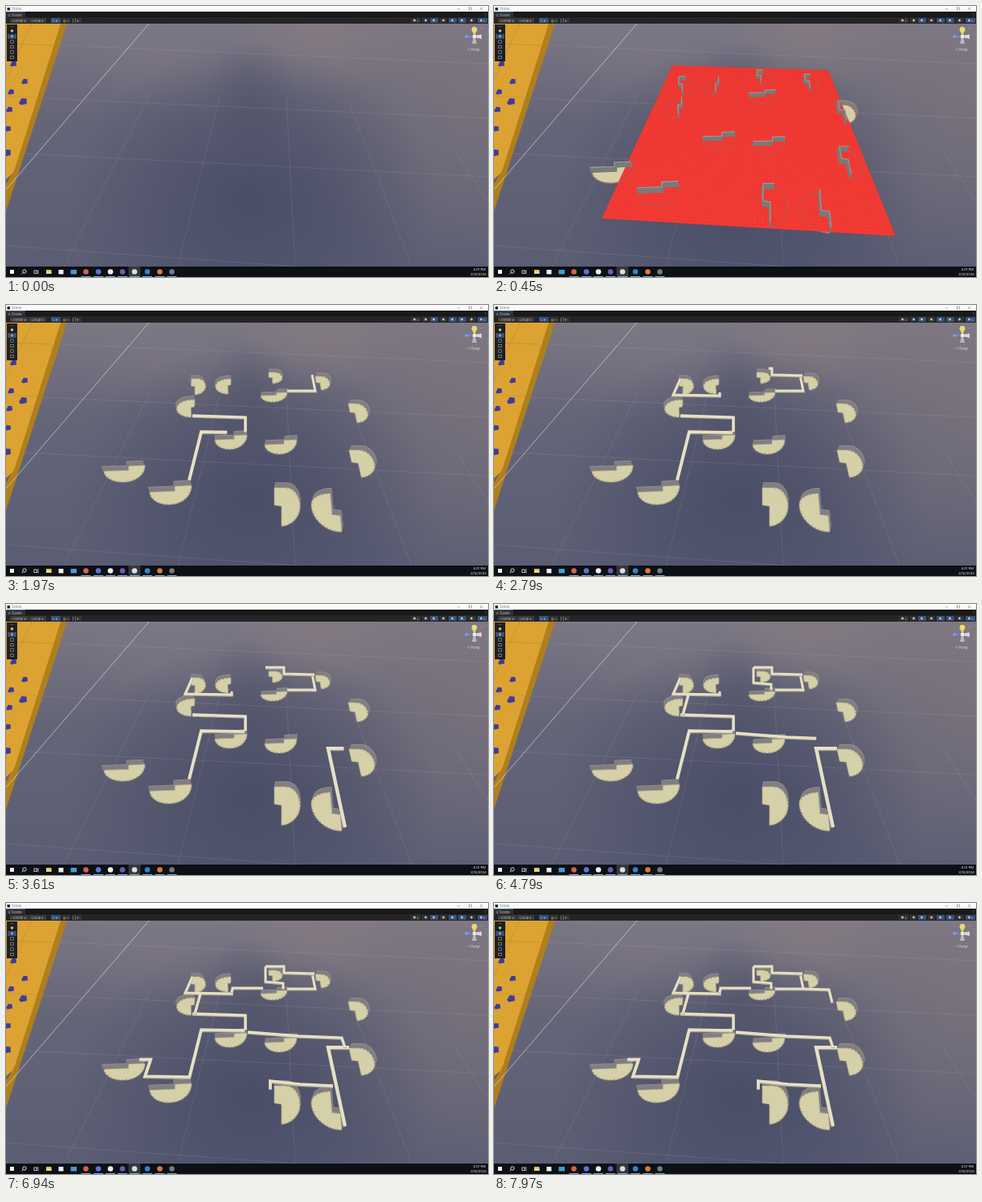
These frames come from a looping animation (600x338 px, 8000 ms). An HTML page with a canvas:

```html
<!DOCTYPE html>
<html lang="en">
<head>
<meta charset="utf-8">
<title>Scene</title>
<style>
html, body { margin: 0; width: 100%; height: 100%; overflow: hidden; background: #111; }
canvas { display: block; width: 600px; height: 338px; }
</style>
</head>
<body>
<canvas id="stage"></canvas>
<script>
const canvas = document.getElementById('stage');
const dpr = window.devicePixelRatio || 1;
canvas.width = 600 * dpr;
canvas.height = 338 * dpr;
let c = canvas.getContext('2d');

const LOOP = 8000, ROOMS_AT = 170, GRID_ON = 230, GRID_OFF = 730;

// Room outlines in a unit box: straight walls, then the curved wall.
const SHAPES = {
  down: ['M0 .35L.6 .3L.6 .05L1 0', 'C1 .6 .75 1 .45 1C.2 1 0 .7 0 .35', '1 0'],
  right: ['M.45 0L0 0L0 .45L.28 .48L.28 1', 'C.7 .98 1 .75 1 .5C1 .2 .75 0 .45 0', '.28 1'],
  left: ['M.62 0L.68 .55L.95 .58L1 1', 'C.4 1 0 .6 0 .3C0 .1 .3 0 .62 0', '1 1'],
  hook: ['M1 0L1 .4L.8 .45L.85 1', 'C.4 1 0 .8 0 .5C0 .2 .4 0 1 0', '.85 1']
};

// shape, x, y, width, height, lean
const rooms = [
  ['right', 327, 84, 17, 14, 0], ['right', 385, 89, 17, 17, .15],
  ['right', 231, 92, 18, 20, -.05], ['hook', 261, 92, 19, 19, -.03],
  ['down', 317, 109, 33, 12, 0], ['hook', 213, 118, 22, 22, -.05],
  ['right', 426, 123, 22, 24, .2], ['down', 260, 162, 40, 18, 0],
  ['down', 322, 168, 40, 18, 0], ['right', 427, 181, 28, 34, .22],
  ['down', 122, 200, 51, 21, 0], ['down', 179, 225, 52, 24, 0],
  ['right', 334, 228, 32, 48, 0], ['left', 380, 235, 38, 48, 0]
].map(([type, x, y, w, h, lean]) => {
  const [straight, curve, join] = SHAPES[type];
  const place = d => {
    const p = new Path2D();
    p.addPath(new Path2D(d), new DOMMatrix([w, 0, lean * h, h, x, y]));
    return p;
  };
  return {
    full: place(straight + curve + 'Z'), straight: place(straight),
    curve: place('M' + join + curve),
    tall: 3 + y / 60, tilt: (x + w / 2 - 300) / 55
  };
});

// start time, then the points the corridor runs through
const corridors = [
  [750, 381, 87, 385, 107, 350, 107],
  [1050, 298, 158, 298, 140, 232, 138],
  [1500, 228, 218, 243, 158, 297, 159],
  [2080, 281, 109, 281, 113, 223, 112, 232, 92],
  [2500, 384, 88, 346, 87, 346, 79, 323, 79],
  [2900, 422, 278, 401, 180, 427, 180],
  [3650, 235, 138, 242, 113],
  [3850, 323, 79, 323, 98, 345, 100, 345, 107],
  [4250, 301, 161, 365, 166, 418, 168, 422, 180],
  [4950, 407, 228, 366, 226, 329, 222, 329, 232],
  [5700, 230, 217, 173, 216, 180, 195, 166, 195],
  [6450, 320, 106, 282, 106, 281, 112],
  [6950, 385, 107, 417, 108, 421, 124],
  [7500]
].map(([start, ...p], i, all) => {
  const path = new Path2D();
  let length = 0;
  for (let k = 0; k < p.length; k += 2) {
    path.lineTo(p[k], p[k + 1]);
    if (k) length += Math.hypot(p[k] - p[k - 2], p[k + 1] - p[k - 1]);
  }
  const end = all[i + 1] ? all[i + 1][0] : start;
  return { start, end, path, length, width: 2.5 + (p[1] || 0) / 150 };
});

function rect(x, y, w, h, fill) {
  c.fillStyle = fill;
  c.fillRect(x, y, w, h);
}
function poly(fill, ...p) {
  c.beginPath();
  for (let i = 0; i < p.length; i += 2) c.lineTo(p[i], p[i + 1]);
  c.closePath();
  c.fillStyle = fill;
  c.fill();
}
function line(color, width, x1, y1, x2, y2) {
  c.beginPath();
  c.moveTo(x1, y1);
  c.lineTo(x2, y2);
  c.strokeStyle = color;
  c.lineWidth = width;
  c.stroke();
}
function dot(x, y, r, fill) {
  c.beginPath();
  c.arc(x, y, r, 0, 7);
  c.fillStyle = fill;
  c.fill();
}
function text(s, x, y, size, fill, align = 'left') {
  c.font = size + 'px Inter, "Open Sans", sans-serif';
  c.textAlign = align;
  c.fillStyle = fill;
  c.fillText(s, x, y);
}
function glow(x, y, rx, ry, rgb, alpha) {
  c.save();
  c.translate(x, y);
  c.scale(rx, ry);
  const g = c.createRadialGradient(0, 0, 0, 0, 0, 1);
  g.addColorStop(0, `rgba(${rgb},${alpha})`);
  g.addColorStop(.5, `rgba(${rgb},${alpha * .55})`);
  g.addColorStop(1, `rgba(${rgb},0)`);
  rect(-1, -1, 2, 2, g);
  c.restore();
}

function drawGround() {
  const g = c.createLinearGradient(0, 22, 0, 325);
  g.addColorStop(0, '#7b7784');
  g.addColorStop(.4, '#656578');
  g.addColorStop(1, '#5a5d73');
  rect(0, 22, 600, 303, g);
  glow(600, 110, 240, 240, '132,121,126', .6);
  glow(390, 40, 110, 70, '140,126,128', .5);
  glow(190, 65, 100, 60, '130,120,130', .35);
  glow(305, 240, 230, 190, '66,71,98', .75);
  glow(305, 120, 60, 80, '76,77,100', .4);

  const faint = 'rgba(190,190,205,.24)';
  for (const [a, b] of [[46, 72], [113, 140], [183, 213], [299, 342]])
    line(faint, .6, 0, a, 600, b);
  line(faint, .6, 180, 108, 72, 325);
  line(faint, .6, 266, 112, 214, 325);
  line(faint, .6, 349, 112, 360, 325);
  line(faint, .6, 427, 120, 505, 325);
  line(faint, .6, 560, 182, 600, 245);
}

function drawSlab() {
  poly('#b07f1d', 67, 22, 76, 22, 0, 256, 0, 222, 10, 205);
  poly('#dca332', 0, 22, 68, 22, 11, 203, 8, 209, 0, 216);
  line('#b98a30', .6, 0, 47, 61, 49);
  line('#b98a30', .6, 32, 22, 0, 92);
  line('#c4933a', .6, 0, 112, 39, 114);
  for (const [x, y, s] of [[9, 72, 4], [23, 94, 4], [6, 107, 4], [21, 119, 5], [4, 129, 4], [2, 153, 4], [1, 183, 5]])
    poly('#3f3c9c', x - s, y + 2, x - s * .3, y - s * .8, x + s * .9, y - s * .7, x + s, y + s * .6, x - s * .5, y + s * .9);
  line('rgba(225,225,230,.8)', .8, 178, 22, 0, 229);
}

function drawTools() {
  rect(1, 23, 13, 46, '#1e1e20');
  rect(2, 35, 11, 6, '#354d6d');
  line('#555', .8, 5, 25.5, 10, 25.5);
  dot(7.5, 31, 1.8, '#c9bd87');
  line('#b9c7dc', .8, 5.5, 38, 9.5, 38);
  line('#b9c7dc', .8, 7.5, 36, 7.5, 40);
  c.lineWidth = .7;
  c.strokeStyle = '#999';
  for (const y of [44.5, 51, 57.5, 64]) c.strokeRect(5.7, y - 1.7, 3.6, 3.4);
}

function drawGizmo() {
  poly('#d8d8dc', 583, 37, 592, 35.5, 592, 41, 583, 39);
  poly('#b7b9c0', 582, 39, 584, 39, 586, 47, 580, 47);
  poly('#e3d05c', 579.5, 29, 586.5, 29, 583.5, 37, 582.5, 37);
  dot(583, 29.3, 3.3, '#eadb78');
  poly('#6a8bdc', 583, 38, 573, 36, 572, 40);
  dot(573, 38, 1.8, '#7fa0e8');
  rect(581, 36, 4, 4, '#e8e8ea');
  dot(592.5, 28.5, 1, '#b98b91');
  text('< Persp', 582, 55.5, 4.3, '#dddde2', 'center');
}

function drawTopBars() {
  rect(0, 0, 600, 7, '#fbfbfb');
  rect(1.5, 2, 3.5, 3.5, '#222');
  text('Scene', 7, 5.3, 4.2, '#777');
  line('#777', .6, 562, 3.7, 565, 3.7);
  c.lineWidth = .6;
  c.strokeStyle = '#777';
  c.strokeRect(576.5, 2, 3, 3);
  line('#777', .6, 590, 2, 593, 5);
  line('#777', .6, 593, 2, 590, 5);

  rect(0, 7, 600, 7, '#191919');
  rect(0, 7.5, 24, 6.5, '#303032');
  rect(0, 7.3, 24, .7, '#3a72b0');
  text('#', 3, 12.6, 4, '#bbb');
  text('Scene', 7, 12.6, 4.3, '#ccc');
  for (const y of [9, 10.7, 12.4]) dot(597, y, .45, '#aaa');

  rect(0, 14, 600, 8, '#242426');
  rect(5, 15, 23, 6, '#3b3b3d');
  rect(29, 15, 21, 6, '#3b3b3d');
  text('▫ Center ▾', 6, 19.5, 4.1, '#bbb');
  text('▫ Local ▾', 30, 19.5, 4.1, '#bbb');
  rect(56, 15, 12, 6, '#36527a');
  rect(70, 15, 10, 6, '#333');
  rect(82, 15, 12, 6, '#333');
  text('⌗ ▾', 58, 19.5, 4.3, '#c8d3e4');
  text('▦ ▾', 71, 19.5, 4, '#888');
  text('|·| ▾', 83, 19.5, 4.3, '#bbb');
  for (const [x, w, on] of [[504, 12, 0], [518, 8, 0], [528, 10, 1], [540, 9, 0], [551, 10, 1], [563, 10, 1], [575, 10, 0], [587, 12, 1]]) {
    rect(x, 15, w, 6, on ? '#36527a' : '#333335');
    dot(x + 4.5, 18, 1.4, '#c7c9ce');
    if (w > 10) text('▾', x + 7.5, 19.5, 3.5, '#bbb');
  }
}

function drawTaskbar() {
  rect(0, 325, 600, 13, '#0d1015');
  rect(152.5, 325, 15, 13, '#34383e');
  rect(5, 329, 5, 5, '#f2f2f2');
  c.beginPath();
  c.arc(23, 331, 2.2, 0, 7);
  c.strokeStyle = '#eee';
  c.lineWidth = .9;
  c.stroke();
  line('#eee', .9, 21.4, 332.6, 19.6, 334.4);
  c.lineWidth = .8;
  c.strokeRect(35, 330, 3.5, 3.5);
  line('#ccc', .8, 40, 329, 40, 334.5);
  rect(50, 329, 6.5, 5, '#e7c15f');
  rect(50, 331, 6.5, 3, '#f0d588');
  rect(65.5, 329, 6, 5.5, '#eee');
  rect(80.5, 329, 7.5, 5.5, '#479bd6');
  const apps = [[99.5, '#d9604b'], [115, '#5b74d8'], [130, '#eee'], [145, '#7658ae'], [160, '#ddd'], [176, '#2f87cf'], [191.5, '#e17b36'], [206.5, '#777b80']];
  for (const [x, color] of apps) {
    dot(x, 331.5, 3.3, color);
    rect(x - 6, 337, 12, 1, '#76a9d0');
  }
  text('4:01 PM', 597, 329.8, 4.1, '#eee', 'right');
  text('2/12/2024', 598, 335.8, 4.1, '#eee', 'right');
}

function drawRooms() {
  for (const r of rooms) {
    for (let k = r.tall; k > 0; k -= .7) {
      c.save();
      c.translate(r.tilt * k / r.tall, -k);
      c.fillStyle = k > r.tall - .7 ? '#9a9494' : '#827e82';
      c.fill(r.full);
      c.restore();
    }
    c.fillStyle = '#d6d0a8';
    c.fill(r.full);
    c.lineWidth = .6;
    c.strokeStyle = '#b3ad93';
    c.stroke(r.full);
    c.setLineDash([.8, 4]);
    c.lineWidth = 2.6;
    c.strokeStyle = '#89846f';
    c.stroke(r.curve);
    c.setLineDash([]);
  }
}

function drawGrid() {
  const at = (u, v) => {
    const lx = 222 - 88 * v, ly = 74 + 191 * v;
    return [lx + (194 + 172 * v) * u, ly + (6 + 16 * v) * u];
  };
  poly('#f43b35', ...at(0, 0), ...at(1, 0), ...at(1, 1), ...at(0, 1));
  for (let i = 0; i <= 70; i++) {
    const u = i / 70, v = u * (.55 + .45 * u);
    line('rgba(150,25,30,.2)', .45, ...at(u, 0), ...at(u, 1));
    line('rgba(150,25,30,.2)', .45, ...at(0, v), ...at(1, v));
  }
  for (const r of rooms) {
    c.lineWidth = .9;
    c.strokeStyle = '#a3625c';
    c.stroke(r.curve);
    for (let k = 0; k <= r.tall; k += .6) {
      c.save();
      c.translate(r.tilt * k / r.tall, -k);
      c.lineWidth = 1.1;
      c.strokeStyle = k > r.tall - .6 ? '#a09a96' : '#767c7b';
      c.stroke(r.straight);
      c.restore();
    }
  }
}

function drawCorridors(t) {
  for (const r of corridors) {
    if (t <= r.start || !r.length) continue;
    const p = Math.min(1, (t - r.start) / (r.end - r.start));
    c.setLineDash([r.length * p + (p === 1 ? 1 : 0), 9999]);
    c.save();
    c.translate(0, 1);
    c.lineWidth = r.width;
    c.strokeStyle = '#aaa594';
    c.stroke(r.path);
    c.restore();
    c.lineWidth = r.width - .3;
    c.strokeStyle = '#e6e1c4';
    c.stroke(r.path);
  }
  c.setLineDash([]);
}

// The unchanging parts are painted once.
const main = c;
const still = document.createElement('canvas');
still.width = canvas.width;
still.height = canvas.height;
c = still.getContext('2d');
c.scale(dpr, dpr);
drawGround();
drawSlab();
drawTools();
drawGizmo();
drawTopBars();
drawTaskbar();
c = main;
c.scale(dpr, dpr);

const t0 = performance.now();
function frame() {
  const t = (performance.now() - t0) % LOOP;
  c.drawImage(still, 0, 0, 600, 338);
  if (t >= ROOMS_AT) drawRooms();
  if (t >= GRID_ON && t < GRID_OFF) drawGrid();
  drawCorridors(t);
  requestAnimationFrame(frame);
}
frame();
</script>
</body>
</html>
```
